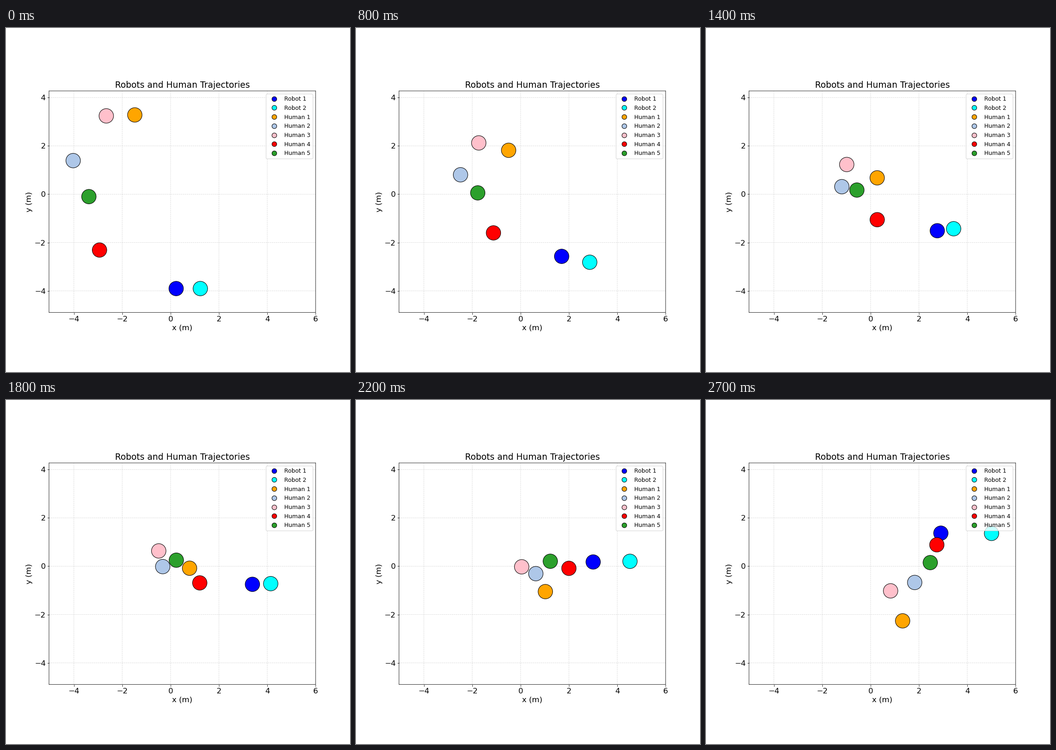
Animation of 748x748 px, one loop 2800 ms. Source, as a matplotlib script:

```python
import numpy as np
import matplotlib.pyplot as plt
from matplotlib.animation import FuncAnimation
from matplotlib.lines import Line2D
from matplotlib.patches import Circle
from matplotlib.spines import Spine

FRAMES = 28
INTERVAL = 100
RADIUS = 0.3
ROBOT_STRIDE = 0.25
HEADING_UNIT = np.pi / 8
TURN_STEP = 18      # the crowd reacts to the robots here
START_UP = 1.5      # time constant of the humans' start

steps = np.arange(FRAMES)[:, None]


def robot_path(start, runs):
    """Equal strides; runs are (heading in units of 22.5 degrees, strides)."""
    headings, counts = zip(*runs)
    angle = HEADING_UNIT * np.repeat(headings, counts)
    strides = ROBOT_STRIDE * np.column_stack([np.cos(angle), np.sin(angle)])
    return np.array(start) + np.cumsum(strides, axis=0)


def human_path(start, cruise, kick=(0, 0), bend=(0, 0), lag=0):
    """Soft start and steady walk, then a velocity kick and acceleration."""
    walked = steps - lag * (1 - np.exp(-steps / START_UP))
    after = np.maximum(steps - TURN_STEP, 0)
    return (np.array(start) + walked * np.array(cruise)
            + after * np.array(kick) + after ** 2 / 2 * np.array(bend))


AGENTS = [
    ("Robot 1", "blue", robot_path(
        (0, -4), [(1, 2), (2, 16), (3, 1), (5, 6), (4, 2), (3, 1)])),
    ("Robot 2", "cyan", robot_path(
        (1, -4), [(1, 5), (2, 4), (3, 6), (2, 4), (3, 9)])),
    ("Human 1", "orange", human_path(
        (-1.48, 3.28), (0.128, -0.19), kick=(-0.068, -0.052), lag=0.3)),
    ("Human 2", "#aec7e8", human_path(
        (-4.03, 1.39), (0.216, -0.082), kick=(0.023, 0.009), lag=0.85)),
    ("Human 3", "pink", human_path(
        (-2.66, 3.24), (0.124, -0.149), bend=(0.005, -0.0077), lag=0.5)),
    ("Human 4", "red", human_path(
        (-2.94, -2.31), (0.233, 0.091), kick=(-0.013, 0.04),
        bend=(-0.011, 0.0098), lag=0.2)),
    ("Human 5", "#2ca02c", human_path(
        (-3.38, -0.1), (0.201, 0.0194), kick=(0.047, -0.0305))),
]


def legend_dot(name, color):
    return Line2D([], [], linestyle="none", marker="o", markersize=10,
                  markerfacecolor=color, markeredgecolor="black", label=name)


plt.rcParams["font.family"] = "DejaVu Sans"

fig, ax = plt.subplots(figsize=(10, 10), dpi=74.8)
ax.set_aspect("equal")
ax.set_xlim(-5.03, 6)
ax.set_ylim(-4.894, 4.272)
ax.set_xticks(range(-4, 7, 2))
ax.set_yticks(range(-4, 5, 2))
ax.tick_params(labelsize=16)
ax.set_xlabel("x (m)", fontsize=16, labelpad=3.5)
ax.set_ylabel("y (m)", fontsize=16)
ax.set_title("Robots and Human Trajectories", fontsize=18, pad=6.5)
ax.grid(True, linestyle="--", alpha=0.5)

# Keep lines at their true positions instead of whole pixels
for line in ax.findobj(lambda a: isinstance(a, (Line2D, Spine))):
    line.set_snap(False)

discs = []
for name, color, path in AGENTS:
    disc = Circle(path[0], RADIUS, facecolor=color,
                  edgecolor="black", linewidth=1, zorder=3)
    discs.append(ax.add_patch(disc))

ax.legend(handles=[legend_dot(name, color) for name, color, _ in AGENTS],
          loc="upper right", fontsize=12, labelspacing=0.54)


def update(step):
    for disc, (_, _, path) in zip(discs, AGENTS):
        disc.center = path[step]
    return discs


anim = FuncAnimation(fig, update, frames=FRAMES, interval=INTERVAL,
                     repeat=True, repeat_delay=0)
plt.show()
```
